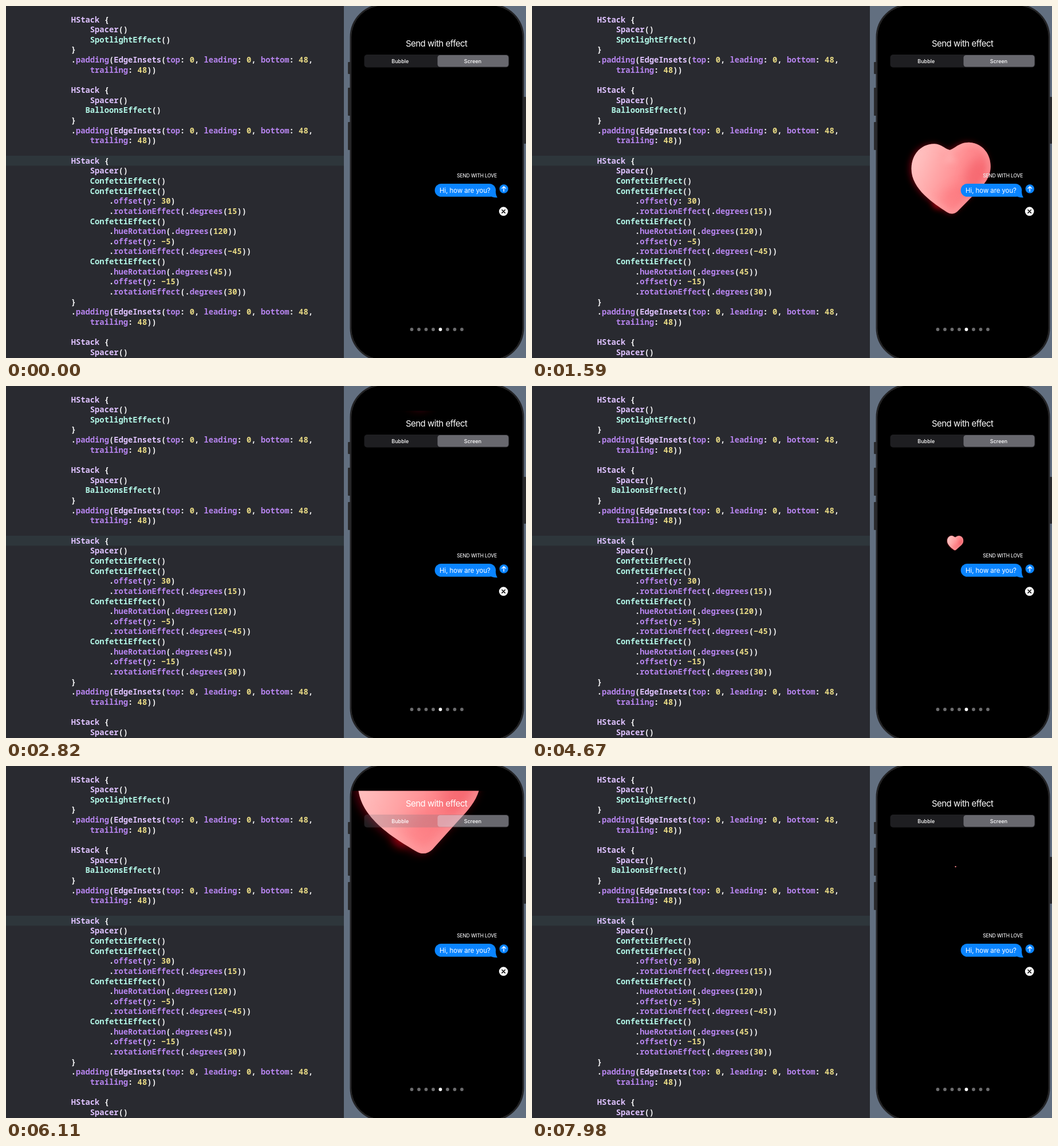
Write an HTML page that moves like this. It is 908 px wide and 616 px high and loops after 8 s.

```html
<!DOCTYPE html>
<html lang="en">
<head>
<meta charset="utf-8">
<title>Send with effect</title>
<style>
  html, body { margin: 0; width: 100%; height: 100%; overflow: hidden; background: #292a30; }
  svg { display: block; width: 908px; height: 616px; }
  #code { font: 600 13.8px "Noto Sans Mono", "DejaVu Sans Mono", monospace; fill: #f6f6f7; }
  .type { fill: #dfc2ff; }
  .own { fill: #b2f6e6; }
  .num { fill: #e6d884; }
  .call { fill: #b684ee; }
  .ui { font-family: Inter, "Liberation Sans", sans-serif; fill: #fff; text-anchor: middle; }
</style>
</head>
<body>
<svg viewBox="0 0 908 616">
  <defs>
    <path id="shape" d="M-17-64C-6-67 4-82.500 27-82.500C56-82.500 77.500-58 77.500-27C77.500-2 62 16 45 33L4 77Q-7 87-20 79C-50 60-104 28-104-20C-104-55-80-77-52-77C-36-77-28-65-17-64Z"/>
    <clipPath id="screen"><rect x="603" y="43.500" width="299" height="573"/></clipPath>
    <clipPath id="inside"><use href="#shape"/></clipPath>
    <linearGradient id="skin" x1="0" y1=".3" x2="1" y2=".62">
      <stop offset="0" stop-color="#ffc6c5"/>
      <stop offset=".3" stop-color="#ffa9aa"/>
      <stop offset=".6" stop-color="#ff8c90"/>
      <stop offset="1" stop-color="#f8727a"/>
    </linearGradient>
    <filter id="soft" x="-60%" y="-60%" width="220%" height="220%"><feGaussianBlur stdDeviation="7"/></filter>
    <filter id="wide" x="-60%" y="-60%" width="220%" height="220%"><feGaussianBlur stdDeviation="12"/></filter>
  </defs>

  <rect width="590" height="616" fill="#292a30"/>
  <rect y="262" width="590" height="17.500" fill="#2e363b"/>
  <g id="code"></g>

  <rect x="590" width="318" height="616" fill="#626f80"/>
  <g fill="#2b2b2d">
    <rect x="597" y="98" width="5" height="21" rx="1"/>
    <rect x="597" y="143" width="5" height="49" rx="1"/>
    <rect x="597" y="203" width="5" height="49" rx="1"/>
    <rect x="904" y="159" width="4" height="82" rx="1"/>
  </g>
  <rect x="601.500" y="-2.500" width="302" height="623" rx="57" fill="#000" stroke="#232325" stroke-width="2"/>
  <rect x="602.700" y="-1.300" width="299.600" height="620.600" rx="56" fill="#000" stroke="#454547" stroke-width=".7"/>

  <g clip-path="url(#screen)">
    <g id="heart">
      <use href="#shape" x="-4" y="0" fill="#c8001c" opacity=".5" filter="url(#soft)"/>
      <circle cx="-42" cy="61" r="11" fill="#e00018" opacity=".65" filter="url(#soft)"/>
      <use href="#shape" fill="url(#skin)"/>
      <g clip-path="url(#inside)">
        <ellipse cx="44" cy="-10" rx="22" ry="38" transform="rotate(20 44 -10)" fill="#f2545f" opacity=".5" filter="url(#wide)"/>
        <ellipse cx="-4" cy="38" rx="32" ry="18" transform="rotate(-25 -4 38)" fill="#fb6e76" opacity=".45" filter="url(#wide)"/>
        <path d="M-17-66Q-20-45-34-34Q-12-40 0-34Q-13-48-17-66" fill="#ffc0c0" opacity=".55" filter="url(#soft)"/>
        <use href="#shape" fill="none" stroke="#ffb4b5" stroke-width="9" opacity=".6" filter="url(#soft)"/>
      </g>
    </g>
  </g>

  <g class="ui">
    <text x="751.700" y="71" font-size="15" letter-spacing="-.5">Send with effect</text>
    <rect x="625.500" y="85" width="253" height="22.500" rx="5" fill="#767680" fill-opacity=".26"/>
    <rect x="753.500" y="86" width="124" height="20.500" rx="4.500" fill="#ebebf5" fill-opacity=".36"/>
    <g font-size="9" font-weight="500">
      <text x="688.300" y="99.700">Bubble</text>
      <text x="815" y="99.700">Screen</text>
    </g>
    <text x="822.300" y="300" font-size="8.500" font-weight="500" letter-spacing="-.17" fill="#ececee">SEND WITH LOVE</text>
    <path d="M855.200 321Q854.500 330 858 335.200Q849 335.500 843 331Z" fill="#0a84ff"/>
    <rect x="748.700" y="311" width="106.500" height="22.800" rx="11.400" fill="#0a84ff"/>
    <text x="801.500" y="326.500" font-size="11.500" letter-spacing="-.1">Hi, how are you?</text>
  </g>
  <circle cx="869.300" cy="320" r="7.700" fill="#0a84ff"/>
  <path d="M869.300 324.200V316.200M866 319.300L869.300 316L872.600 319.300" fill="none" stroke="#fff" stroke-width="1.400" stroke-linecap="round" stroke-linejoin="round"/>
  <circle cx="868.700" cy="359.400" r="7.800" fill="#fff"/>
  <path d="M866 356.700L871.400 362.100M871.400 356.700L866 362.100" stroke="#000" stroke-width="1.500" stroke-linecap="round"/>
  <g id="dots"></g>
</svg>
<script>
const padding = `.padding(EdgeInsets(top: 0, leading: 0, bottom: 48,
    trailing: 48))
`;
const source = `HStack {
    Spacer()
    SpotlightEffect()
}
${padding}
HStack {
    Spacer()
   BalloonsEffect()
}
${padding}
HStack {
    Spacer()
    ConfettiEffect()
    ConfettiEffect()
        .offset(y: 30)
        .rotationEffect(.degrees(15))
    ConfettiEffect()
        .hueRotation(.degrees(120))
        .offset(y: −5)
        .rotationEffect(.degrees(−45))
    ConfettiEffect()
        .hueRotation(.degrees(45))
        .offset(y: −15)
        .rotationEffect(.degrees(30))
}
${padding}
HStack {
    Spacer()`;

const token = /(HStack|Spacer|EdgeInsets)|(\w+Effect(?=\(\)))|(−?\d+)|([a-z]\w*)/g;
const paint = line => line.replace(token, (word, type, own, num) => {
  const kind = type ? "type" : own ? "own" : num ? "num" : "call";
  return `<tspan class="${kind}">${word}</tspan>`;
});

document.getElementById("code").innerHTML = source.split("\n").map((line, i) => {
  const text = line.trimStart();
  const x = 113.7 + 8.28 * (line.length - text.length);
  return `<text x="${x}" y="${28.5 + 17.65 * i}">${paint(text)}</text>`;
}).join("");

document.getElementById("dots").innerHTML = Array.from({ length: 8 }, (_, i) =>
  `<circle cx="${708.5 + 12.5 * i}" cy="566" r="2.9" fill="${i === 4 ? "#fff" : "#6c6c6e"}"/>`).join("");

// Each flight: [time, heart width, anchor y]
const flights = [
  [[600, 1, 414], [900, 20, 400], [1380, 101, 338.5], [1590, 138, 301],
   [2190, 208, 143], [2820, 224, -62]],
  [[3770, 76, 10], [3920, 41, 58], [4330, 0.5, 186], [4550, 12, 252], [4670, 28, 274.5],
   [4950, 88, 300], [5200, 143, 297], [5360, 166, 284.5], [5510, 181.5, 243.5],
   [6110, 214, 56], [6590, 224, -63]],
  [[7440, 74, 8], [7590, 41, 58], [7980, 2.5, 176], [8000, 2, 181]]
];

// Smooth curve through the keys, sampled at t
function sample(keys, t, col) {
  const last = keys.length - 1;
  if (t >= keys[last][0]) return keys[last][col];
  const i = keys.findIndex(k => k[0] > t) - 1;
  const slope = j => {
    const a = keys[Math.max(j - 1, 0)], b = keys[Math.min(j + 1, last)];
    return (b[col] - a[col]) / (b[0] - a[0]);
  };
  const a = keys[i], b = keys[i + 1], d = b[0] - a[0], u = (t - a[0]) / d, v = 1 - u;
  return v * v * ((1 + 2 * u) * a[col] + u * d * slope(i))
       + u * u * ((3 - 2 * u) * b[col] - v * d * slope(i + 1));
}

const heart = document.getElementById("heart");
const start = performance.now();

function draw() {
  const t = Math.max(0, performance.now() - start) % 8000;
  const keys = flights.filter(f => f[0][0] <= t).pop();
  heart.style.display = keys ? "" : "none";
  if (keys) {
    const scale = Math.max(sample(keys, t, 1), 0.5) / 181.5;
    // The heart leans about its tip as it grows
    const lean = 6 * (1 - scale);
    heart.setAttribute("transform",
      `translate(739.7 ${sample(keys, t, 2)}) scale(${scale}) rotate(${lean} -7 82)`);
  }
  requestAnimationFrame(draw);
}
draw();
</script>
</body>
</html>
```
